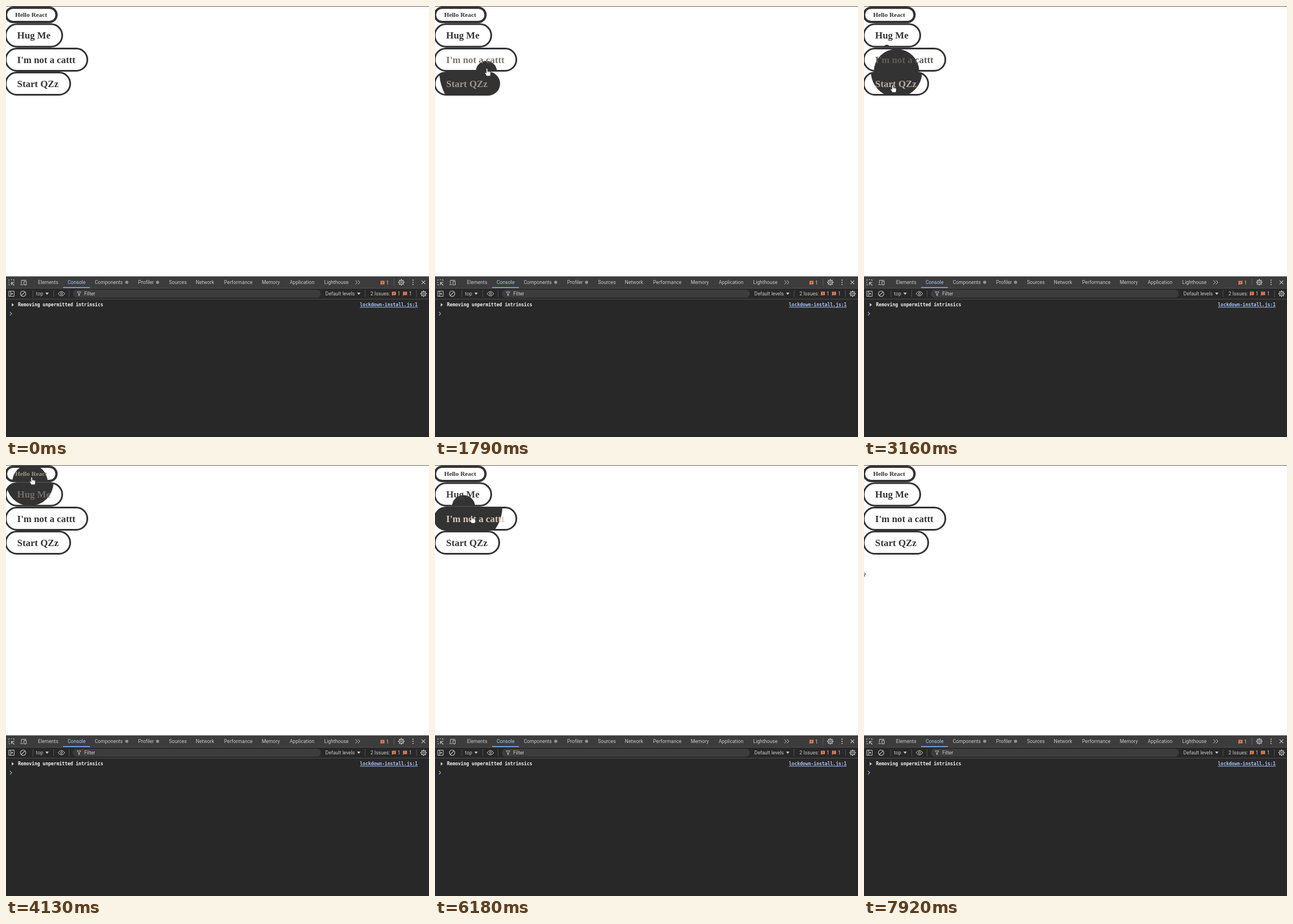
Animation, 741 px wide and 755 px high, one loop 7.99 s. Source, as an HTML page with a canvas:

```html
<!DOCTYPE html>
<html lang="en">
<head>
<meta charset="utf-8">
<title>Position-aware buttons</title>
<style>
  html, body { margin: 0; width: 100%; height: 100%; overflow: hidden; background: #fff; }
  canvas { display: block; }
</style>
</head>
<body>
<canvas id="stage" width="741" height="755"></canvas>
<script>
const ctx = document.getElementById('stage').getContext('2d');
const LOOP = 7990, FIRST = 130, TICK = 68.94;
const GROW = 500, FADE = 300, RADIUS = 101;
const INK = '#333333', ICON = '#c7c7c7', BLUE = '#7cacf8', ORANGE = '#e58058';
const UI = '8.6px Roboto, sans-serif';
const MONO = 'bold 8px "DejaVu Sans Mono", monospace';

const buttons = [
  { label: 'Hello React', right: 90.5, top: 1, bottom: 30, line: 4, x: 16, base: 19.4, size: 11.25 },
  { label: 'Hug Me', right: 100, top: 30.3, bottom: 72.8, line: 3, x: 19.6, base: 57.4, size: 16.8 },
  { label: "I'm not a cattt", right: 144, top: 73, bottom: 115, line: 3, x: 19.6, base: 99.8, size: 16.8 },
  { label: 'Start QZz', right: 114, top: 115, bottom: 157, line: 3, x: 19.6, base: 142.3, size: 16.8 }
];

// Pointer path: time, x, y
const path = [
  [0, 760, 790], [130, 724, 742], [400, 420, 440], [650, 190, 260], [890, 103, 197],
  [955, 97, 155], [1040, 92, 148], [1510, 90, 148], [1715, 90, 114], [1790, 91, 109],
  [2130, 74, 74], [2330, 60, 48], [2400, 55, 30], [2480, 52, 20], [2600, 48, 30],
  [2820, 40, 73], [3030, 57, 115], [3160, 50, 138], [3300, 55, 135], [3400, 60, 115],
  [3500, 55, 100], [3640, 0, 90], [3740, -8, 75], [3850, 0, 58], [4025, 42, 30],
  [4130, 45, 21], [4300, 52, 31], [4480, 56, 73], [4600, 66, 90], [4700, 60, 73],
  [4860, 45, 30], [5000, 30, 16], [5120, 0, 16], [5350, -6, 21], [5480, -20, 24],
  [5620, -2, 14], [5700, 30, 18], [5820, 40, 30], [6000, 50, 73], [6150, 60, 100],
  [6260, 70, 73], [6380, 100, 55], [6470, 144, 74], [6950, 125, 83], [7150, 147, 100],
  [7230, 198, 114], [7550, 110, 200], [7750, 45, 211], [7920, -4, 184]
];

function pointer(t) {
  let i = 1;
  while (i < path.length - 1 && path[i][0] < t) i++;
  const [t0, x0, y0] = path[i - 1], [t1, x1, y1] = path[i];
  const k = Math.min(1, (t - t0) / (t1 - t0));
  return { x: x0 + (x1 - x0) * k, y: y0 + (y1 - y0) * k };
}

// cubic-bezier(.25, .1, .25, 1)
function ease(p) {
  if (p <= 0) return 0;
  if (p >= 1) return 1;
  const bez = (a, b, u) => 3 * a * u * (1 - u) ** 2 + 3 * b * u * u * (1 - u) + u ** 3;
  let lo = 0, hi = 1;
  for (let i = 0; i < 20; i++) {
    const mid = (lo + hi) / 2;
    if (bez(.25, .25, mid) < p) lo = mid; else hi = mid;
  }
  return bez(.1, 1, lo);
}

const inside = (b, p) => p.x >= 0 && p.x <= b.right && p.y >= b.top && p.y < b.bottom;

function stateAt(b, t) {
  const e = b.events.findLast(ev => ev.t <= t);
  const move = (from, span) => from + (e.on - from) * ease((t - e.t) / span);
  return { x: e.x, y: e.y, grow: move(e.grow, GROW), fade: move(e.fade, FADE) };
}

// Record every hover start and end with the point where it happened
for (const b of buttons) {
  b.events = [{ t: 0, x: 0, y: 0, on: 0, grow: 0, fade: 0 }];
  for (let t = 0, was = false; t < LOOP; t += 2) {
    const p = pointer(t), now = inside(b, p);
    if (now !== was) {
      const { grow, fade } = stateAt(b, t);
      b.events.push({ t, ...p, on: +now, grow, fade });
    }
    was = now;
  }
}

function rect(x, y, w, h, color) {
  ctx.fillStyle = color;
  ctx.fillRect(x, y, w, h);
}

function disc(x, y, r, color) {
  ctx.fillStyle = color;
  ctx.beginPath();
  ctx.arc(x, y, r, 0, 7);
  ctx.fill();
}

function ring(x, y, r, width = 1) {
  ctx.lineWidth = width;
  ctx.strokeStyle = ICON;
  ctx.beginPath();
  ctx.arc(x, y, r, 0, 7);
  ctx.stroke();
}

function text(str, x, y, font, color) {
  ctx.font = font;
  ctx.fillStyle = color;
  ctx.fillText(str, x, y);
}

function stroke(d, color = ICON, width = 1) {
  ctx.lineWidth = width;
  ctx.strokeStyle = color;
  ctx.stroke(new Path2D(d));
}

function fill(d, color = ICON) {
  ctx.fillStyle = color;
  ctx.fill(new Path2D(d));
}

function pill(b, inset) {
  const h = b.bottom - b.top - 2 * inset;
  ctx.beginPath();
  ctx.roundRect(-2 + inset, b.top + inset, b.right + 2 - 2 * inset, h, h / 2);
}

function drawButton(b, t) {
  const s = stateAt(b, t);
  ctx.save();
  pill(b, 0.5);
  ctx.clip();
  if (s.grow > 0.002) disc(s.x, s.y, s.grow * RADIUS, INK);
  ctx.restore();
  pill(b, b.line / 2);
  ctx.lineWidth = b.line;
  ctx.strokeStyle = INK;
  ctx.stroke();
  const mix = (from, to) => Math.round(from + (to - from) * s.fade);
  const color = `rgb(${mix(51, 232)}, ${mix(51, 215)}, ${mix(51, 190)})`;
  text(b.label, b.x, b.base, `bold ${b.size}px "Liberation Serif", serif`, color);
}

function gear(x, y) {
  ring(x, y, 1.5);
  ring(x, y, 3.7, 1.2);
  for (let i = 0; i < 8; i++) {
    const a = i * Math.PI / 4;
    disc(x + 4.8 * Math.cos(a), y + 4.8 * Math.sin(a), 0.9, ICON);
  }
}

function badge(x, y, mark) {
  fill(`M${x} ${y}h7v6h-5.5l-1.5 1.5z`, ORANGE);
  stroke(mark === 'x' ? `M${x + 2.2} ${y + 1.6}l2.6 2.6m0-2.6l-2.6 2.6` : `M${x + 3.5} ${y + 1}v2.4m0 .8v1`, '#3c3c3c', 0.9);
}

const caret = (x, y) => fill(`M${x} ${y}h6l-3 4z`);

function drawTabs() {
  rect(0, 474, 741, 20, '#3c3c3c');
  rect(0, 473.5, 741, 0.8, '#555555');
  stroke('M6 479.5h-1v2m0 2v2m0 2v1h2m1.5-9h2m2 0h1.5v2m0 2v1');
  stroke('M14.5 489.5l-5-5m0 4.2v-4.4h4.4', ICON, 1.1);
  stroke('M27 486.5v-6h8.5M25 488h5M31.5 482.5h4v6h-4z');
  const tabs = [['Elements', 56], ['Console', 108], ['Components', 155.5], ['Profiler', 231.5],
    ['Sources', 285.5], ['Network', 332.5], ['Performance', 382], ['Memory', 448],
    ['Application', 497], ['Lighthouse', 557.5]];
  for (const [name, x] of tabs) text(name, x, 487, UI, name === 'Console' ? '#a8c7fa' : ICON);
  rect(100, 492.5, 47, 1.5, BLUE);
  disc(211.5, 484, 2.8, '#929292');
  disc(265.5, 484, 2.8, '#929292');
  stroke('M612 480.5l3.5 3.5l-3.5 3.5m4.5-7l3.5 3.5l-3.5 3.5');
  badge(656, 481.5, 'x');
  text('1', 666, 487.5, UI, ICON);
  rect(679, 478, 1, 12, '#5e5e5e');
  gear(692.5, 484);
  for (const y of [480.3, 484, 487.7]) disc(713, y, 1, ICON);
  stroke('M728 480.8l6.4 6.4m0-6.4l-6.4 6.4', ICON, 1.1);
}

function drawToolbar() {
  rect(0, 494, 741, 1, '#4c4c4c');
  rect(0, 513, 741, 1, '#4c4c4c');
  stroke('M4.8 499.5h9.5v9h-9.5zM7.8 499.5v9');
  fill('M9.5 501.8l3 2.2l-3 2.2z');
  ring(30, 504, 4.7, 1.1);
  stroke('M26.8 507.2l6.4-6.4', ICON, 1.1);
  for (const x of [46.5, 83, 110, 628.5, 718.5]) rect(x, 498, 1, 12, '#535353');
  text('top', 52.5, 507, UI, ICON);
  caret(69, 502);
  stroke('M91.3 504q5.7-8 11.7 0q-6 8-11.7 0z');
  ring(97.2, 504, 1.8);
  ctx.fillStyle = '#3c3c3c';
  ctx.beginPath();
  ctx.roundRect(117, 497, 434.5, 14, 7);
  ctx.fill();
  stroke('M124.8 500.8h6.4l-2.5 3.2v3.3h-1.4v-3.3z', ICON, 0.9);
  text('Filter', 137, 507, UI, '#cfcfcf');
  text('Default levels', 559.5, 507, UI, ICON);
  caret(615, 502);
  text('2 Issues:', 638.5, 507, UI, ICON);
  badge(676, 500.5, 'x');
  text('1', 686, 507, UI, ICON);
  badge(695.5, 500.5, '!');
  text('1', 706, 507, UI, ICON);
  gear(731.5, 504);
}

function drawConsole() {
  rect(0, 474, 741, 281, '#282828');
  drawTabs();
  drawToolbar();
  fill('M10 520.5l4 3l-4 3z');
  text('Removing unpermitted intrinsics', 21, 526.3, MONO, '#f4f4f4');
  text('lockdown-install.js:1', 620, 526.3, MONO, '#a8c7fa');
  rect(620, 527.3, 101, 0.9, '#a8c7fa');
  stroke('M7 536l3 3l-3 3', BLUE, 1.1);
}

const HAND = 'M-1.2 .8Q0-.8 1.2.8V5Q2.3 4.2 3.1 5.2Q4.3 4.6 5 5.8Q6.6 5.4 6.6 7.2V10Q6.4 12 5.3 13.5H-.4Q-1.7 11.3-3.6 8.5Q-4.2 6.9-2.6 7.1L-1.2 8.4Z';
const ARROW = 'M0 0V10L2.3 8L4 11.3L5.4 10.6L3.9 7.4H7.2Z';

function drawPointer(t) {
  const p = pointer(t), hot = buttons.some(b => inside(b, p));
  ctx.save();
  ctx.translate(p.x, p.y);
  fill(hot ? HAND : ARROW, '#ffffff');
  stroke(hot ? HAND : ARROW, '#222222', 0.8);
  if (hot) stroke('M1.2 5V7.5M3.1 5.4V7.6M5 6V7.8', '#555555', 0.5);
  ctx.restore();
}

function draw(t) {
  rect(0, 0, 741, 755, '#ffffff');
  rect(0, 0, 741, 1, '#626262');
  for (const b of buttons) drawButton(b, t);
  drawConsole();
  if (t >= FIRST) drawPointer(t);
}

function frame(now) {
  const t = now % LOOP;
  draw(t < FIRST ? 0 : FIRST + Math.floor((t - FIRST) / TICK + 0.3) * TICK);
  requestAnimationFrame(frame);
}
frame(performance.now());
</script>
</body>
</html>
```
